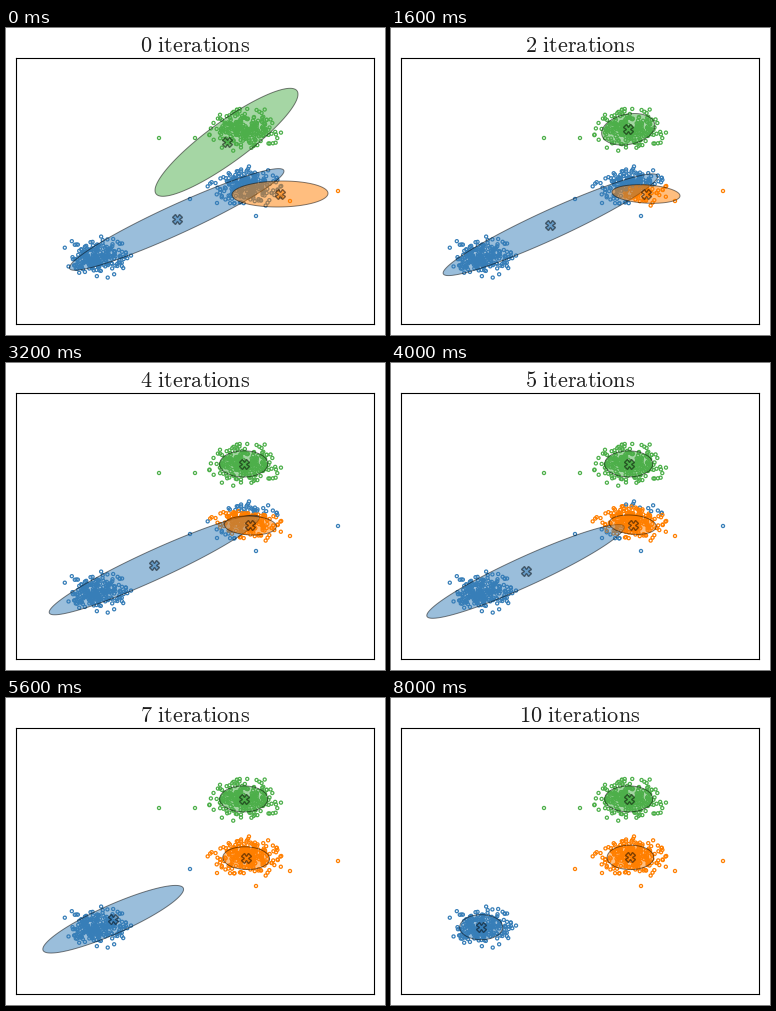
A matplotlib script for the animation above (8.8 s loop, 379 px wide and 307 px high).

```python
import numpy as np
import matplotlib.pyplot as plt
from matplotlib.animation import FuncAnimation

plt.rcParams["mathtext.fontset"] = "cm"

W, H, DPI = 379, 307, 100
LEFT, RIGHT, TOP, BOTTOM = 10.2, 367.7, 30.2, 296.2
STEPS = 11
COLORS = ["#377eb8", "#4daf4a", "#ff7f00"]
MIDDLE_SIZE = 1.2  # size of the middle cluster relative to the lower one
STRAYS = [(153, 110), (189, 110), (332, 163), (284, 173),
          (184, 171), (211, 175), (250, 188)]


def gaussian(cx, cy, a, b, rho=0):
    """Mean and covariance of the ellipse with half extents a and b."""
    cross = -rho * a * b
    return np.array([cx, cy]), np.array([[a * a, cross], [cross, b * b]]) / 2


LOWER = gaussian(90.2, 229.2, 21.5, 12.5)
UPPER = gaussian(237.7, 100.9, 24, 13)
MIDDLE = gaussian(239.3, 159.3, 24, 12.4)
UPPER_START = gaussian(220.5, 114.3, 71.5, 54, .89)

# Step, centre x, centre y, half width, half height, correlation
ORANGE_KEYS = np.array([
    (0, 274, 166, 48, 13, .05),
    (2, 255, 166, 34, 9.3, -.2),
    (4, 244.3, 162.5, 26, 9.5, -.1),
    (5, 241.7, 161.7, 23.5, 9.7, -.18),
    (8, 239.4, 159.4, 23.3, 12.2, 0),
])


def blue_share(step):
    """Part of the blue component's weight lying in the middle cluster."""
    return np.interp(step, [0, 4, 7, 8, 9, 10],
                     [.54, .389, .114, .03, .002, 0])


def blue(step):
    p = blue_share(step)
    gap = MIDDLE[0] - LOWER[0]
    return LOWER[0] + p * gap, LOWER[1] + p * (1 - p) * np.outer(gap, gap)


def green(step):
    rest = .17 ** step
    return [end + rest * (start - end)
            for start, end in zip(UPPER_START, UPPER)]


def orange(step):
    keys = ORANGE_KEYS.T
    return gaussian(*(np.interp(step, keys[0], row) for row in keys[1:]))


MODELS = [blue, green, orange]
rng = np.random.default_rng(4)


def cluster(model, count=235):
    z = rng.normal(size=(count * 2, 2))
    z = z[np.hypot(*z.T) < 2.6][:count]
    return model[0] + .95 * z @ np.linalg.cholesky(model[1]).T


points = np.vstack([cluster(m) for m in (LOWER, UPPER, MIDDLE)] + [STRAYS])


def outline(model):
    t = np.linspace(0, 2 * np.pi, 160)
    circle = np.sqrt(2) * np.column_stack([np.cos(t), np.sin(t)])
    return model[0] + circle @ np.linalg.cholesky(model[1]).T


def score(model, weight):
    mean, cov = model
    d = points - mean
    dist = np.sum(d @ np.linalg.inv(cov) * d, axis=1)
    return np.log(weight) - (dist + np.log(np.linalg.det(cov))) / 2


def labels(step):
    p = blue_share(step)
    taken = p / (1 - p)
    weights = (1 + taken, MIDDLE_SIZE, MIDDLE_SIZE - taken)
    return np.argmax([score(m(step), w) for m, w in zip(MODELS, weights)],
                     axis=0)


fig = plt.figure(figsize=(W / DPI, H / DPI), dpi=DPI, facecolor="white")
ax = fig.add_axes([LEFT / W, 1 - BOTTOM / H,
                   (RIGHT - LEFT) / W, (BOTTOM - TOP) / H])
ax.set(xlim=(LEFT, RIGHT), ylim=(BOTTOM, TOP), xticks=[], yticks=[])
for spine in ax.spines.values():
    spine.set_linewidth(.8)

title = ax.text((LEFT + RIGHT) / 2, 24, "", fontsize=16, color="0.12",
                ha="center", va="baseline")
dots = ax.scatter(*points.T, s=5, facecolors="none", linewidths=.9, zorder=2)
ellipses, crosses = [], []
for color, model in zip(COLORS, MODELS):
    ellipses += ax.fill(*outline(model(0)).T, fc=color, ec="black",
                        lw=.7, alpha=.5, zorder=3)
    crosses += ax.plot([], [], "X", ms=7, mfc=color, mec="black",
                       mew=1, alpha=.5, zorder=4)


def draw(step):
    title.set_text(rf"$\mathrm{{{step}\ iterations}}$")
    dots.set_edgecolor([COLORS[k] for k in labels(step)])
    for model, ellipse, cross in zip(MODELS, ellipses, crosses):
        pose = model(step)
        ellipse.set_xy(outline(pose))
        cross.set_data(*pose[0].reshape(2, 1))
    return [title, dots, *ellipses, *crosses]


anim = FuncAnimation(fig, draw, frames=STEPS, interval=800,
                     repeat=True, repeat_delay=0)
plt.show()
```
